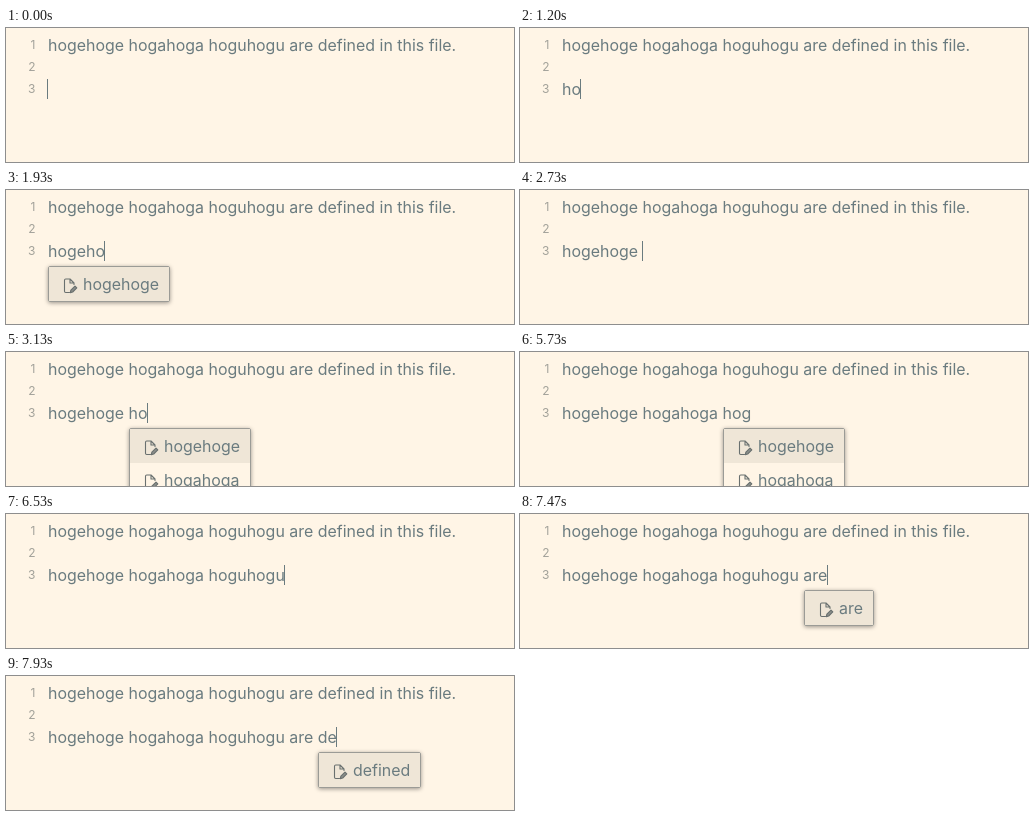
An HTML page for the animation above (8000 ms loop, 508x134 px).

```html
<!DOCTYPE html>
<html lang="en">
<head>
<meta charset="utf-8">
<title>Word completion</title>
<style>
  html, body { margin: 0; width: 100%; height: 100%; overflow: hidden; background: #fff5e6; }
  svg { display: block; font: 15.95px Inter, sans-serif; fill: #6a7b7f; }
  text { white-space: pre; }
  .number { font-size: 12px; fill: #a3a29a; text-anchor: end; }
  .box { fill: #fff5e6; stroke: #9b9b96; filter: drop-shadow(0 1px 2px rgba(0, 0, 0, .4)); }
  .selected { fill: #efe6d7; }
  .page, .pencil { fill: none; stroke: #69706f; stroke-width: 1.1; stroke-linejoin: round; stroke-linecap: round; }
  .pencil { fill: #8b8f8b; }
</style>
</head>
<body>
<svg width="508" height="134" viewBox="0 0 508 134">
  <text class="number" x="29.5" y="21">1</text>
  <text class="number" x="29.5" y="43">2</text>
  <text class="number" x="29.5" y="65">3</text>
  <text x="42" y="23">hogehoge hogahoga hoguhogu are defined in this file.</text>
  <text id="line" x="42" y="67"></text>
  <rect id="caret" y="51" width="1" height="20"/>
  <g id="popup">
    <rect class="box" id="box" x=".5" y=".5" rx="1.5"/>
    <rect class="selected" id="selected" x="1" y="1" height="34"/>
    <g id="items"></g>
  </g>
</svg>
<script>
const LOOP = 8000;
const LEFT = 42;
const ROW = 34;
const WORDS = ['hogehoge', 'hogahoga', 'hoguhogu'];
const PAGE = 'M21.5 26.5H17.7Q16.5 26.5 16.5 25.3V14.2Q16.5 13 17.7 13H22L26 17V18.5M22 13V17H26';
const PENCIL = 'M22.3 26.6L22.9 24.2L27 20.1L28.8 21.9L24.7 26Z';

// Each step: start time, typed text, suggestions, caret visible
const STEPS = [
  [0, '', [], true],
  [600, '', [], false],
  [1070, 'h', [], true],
  [1200, 'ho', [], true],
  [1270, 'ho', WORDS, true],
  [1330, 'hog', WORDS, true],
  [1470, 'hoge', WORDS, true],
  [1600, 'hogeh', ['hogehoge'], true],
  [1800, 'hogeho', ['hogehoge'], true],
  [2330, 'hogehoge', [], true],
  [2730, 'hogehoge ', [], true],
  [2930, 'hogehoge h', [], true],
  [3070, 'hogehoge ho', [], true],
  [3130, 'hogehoge ho', WORDS, true],
  [3270, 'hogehoge hog', WORDS, true],
  [3400, 'hogehoge hoga', WORDS, true],
  [3530, 'hogehoge hoga', ['hogahoga'], true],
  [3930, 'hogehoge hoga', ['hogahoga'], false],
  [4400, 'hogehoge hogahoga', [], true],
  [4670, 'hogehoge hogahoga ', [], true],
  [4870, 'hogehoge hogahoga h', [], true],
  [5000, 'hogehoge hogahoga ho', [], true],
  [5070, 'hogehoge hogahoga ho', WORDS, true],
  [5200, 'hogehoge hogahoga hog', WORDS, true],
  [5730, 'hogehoge hogahoga hog', WORDS, false],
  [5930, 'hogehoge hogahoga hogu', WORDS, true],
  [6070, 'hogehoge hogahoga hogu', ['hoguhogu'], true],
  [6530, 'hogehoge hogahoga hoguhogu', [], true],
  [7000, 'hogehoge hogahoga hoguhogu ', [], true],
  [7130, 'hogehoge hogahoga hoguhogu a', [], true],
  [7270, 'hogehoge hogahoga hoguhogu ar', [], true],
  [7330, 'hogehoge hogahoga hoguhogu ar', ['are'], true],
  [7400, 'hogehoge hogahoga hoguhogu are', ['are'], true],
  [7530, 'hogehoge hogahoga hoguhogu are ', [], true],
  [7670, 'hogehoge hogahoga hoguhogu are d', [], true],
  [7870, 'hogehoge hogahoga hoguhogu are d', ['defined'], true],
  [7930, 'hogehoge hogahoga hoguhogu are de', ['defined'], true]
];

const byId = id => document.getElementById(id);
const [line, caret, popup, box, selected, items] =
  ['line', 'caret', 'popup', 'box', 'selected', 'items'].map(byId);

const pen = document.createElement('canvas').getContext('2d');
pen.font = '15.95px Inter, sans-serif';
const widthOf = text => pen.measureText(text).width;

function drawPopup(text, words) {
  popup.style.display = words.length ? '' : 'none';
  if (!words.length) return;
  const wordStart = LEFT + widthOf(text.slice(0, text.lastIndexOf(' ') + 1));
  const width = Math.round(Math.max(...words.map(widthOf)) + 45.7);
  popup.setAttribute('transform', `translate(${Math.round(wordStart + .2)} 76)`);
  box.setAttribute('width', width - 1);
  box.setAttribute('height', words.length * ROW + 1);
  selected.setAttribute('width', width - 2);
  items.innerHTML = words.map((word, i) =>
    `<g transform="translate(0 ${i * ROW})"><path class="page" d="${PAGE}"/>` +
    `<path class="pencil" d="${PENCIL}"/><text x="35" y="24">${word}</text></g>`).join('');
}

let shown = null;

function render(time) {
  const step = STEPS.findLast(([start]) => start <= time);
  if (step === shown) return;
  shown = step;
  const [, text, words, caretOn] = step;
  line.textContent = text;
  caret.setAttribute('x', Math.round(LEFT + widthOf(text) - .55));
  caret.style.display = caretOn ? '' : 'none';
  drawPopup(text, words);
}

const begin = performance.now();
function tick() {
  render((performance.now() - begin) % LOOP);
  requestAnimationFrame(tick);
}
tick();
</script>
</body>
</html>
```
